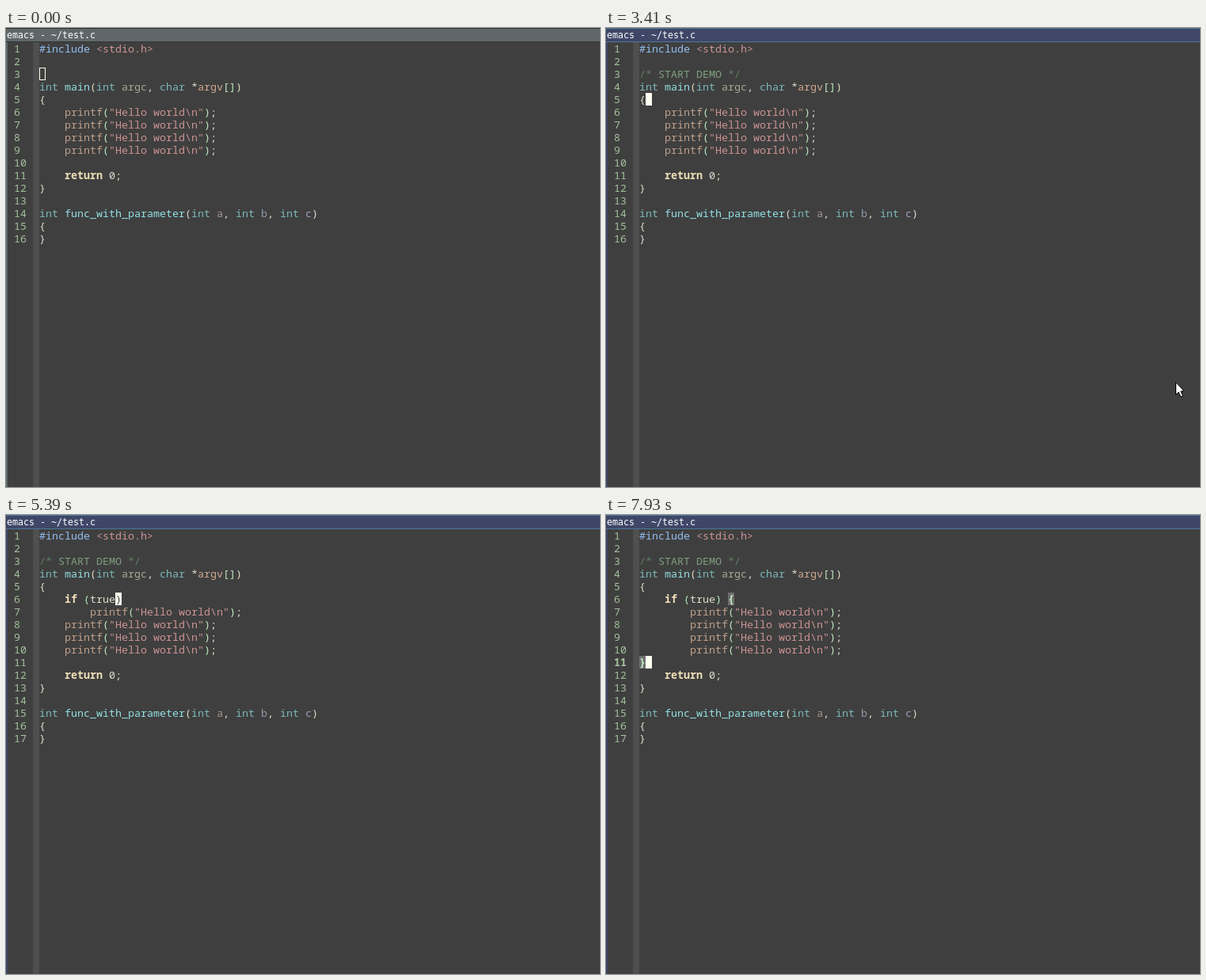
An HTML page with a canvas for the animation above (8000 ms loop, 750 by 580 pixels).

```html
<!DOCTYPE html>
<html lang="en">
<head>
<meta charset="utf-8">
<title>Editor session</title>
<style>
html, body { margin: 0; width: 100%; height: 100%; overflow: hidden; background: #3f3f3f; }
canvas { display: block; }
</style>
</head>
<body>
<canvas id="stage" width="750" height="580"></canvas>
<script>
const ctx = document.getElementById('stage').getContext('2d');
const LOOP = 8000, LEFT = 42, TOP = 18, CW = 8, LH = 16, WIDTH = 750, HEIGHT = 580;
const MONO = '13.333px "Noto Sans Mono", "DejaVu Sans Mono", monospace';

const BG = '#3f3f3f', FG = '#dcdccc', STRING = '#cc9393', CURSOR = '#ffffef';
const KEYWORD = '#f0e0b8', TYPE = '#7cb8bb', FUNC = '#93e0e3', INNER = '#bfebbf';
const WORDS = {
  '#include': '#94bff3', int: TYPE, char: TYPE, main: FUNC, func_with_parameter: FUNC,
  return: KEYWORD, if: KEYWORD, printf: '#c0a08a', argc: '#a3ab94', argv: '#d0a890',
  a: '#a0958f', b: '#8f9cac', c: '#a3a0c0', i: '#8fb29c'
};
const TOKEN = /\/\*|\*\/|"?[\w ]+\\n"|<[\w.]+>|#?\w+|[(){}\[\]]|[^\s\w]/g;

// Moments of the session in ms
const FOCUS = 300, SOLID = 410, OPEN_COMMENT = 980, FILL_COMMENT = 2230;
const DOWN = 3370, NEWLINE = 3760, REPAIR = 4400, TRAIL = 6770, SELECT = 6810;
const WRAP = 7760, MATCH = 7930;
const STEP = 40, REPEAT = 132.5;

// One time per keystroke of TYPED
const TYPED = 'if (true) ';
const KEYS = [4360, 4480, 4560, 4750, 4940, 5140, 5310, 5390, 5610, 5800];

const typedCount = t => KEYS.filter(k => k <= t).length;
const within = (t, a, b) => t >= a && t < b;

function box(x, y, w, h, color) {
  ctx.fillStyle = color;
  ctx.fillRect(x, y, w, h);
}

function cell(row, col, color) {
  box(LEFT + col * CW, TOP + row * LH, CW, LH, color);
}

function text(s, x, row, color, bold) {
  ctx.font = (bold ? 'bold ' : '') + MONO;
  ctx.fillStyle = color;
  ctx.fillText(s, x, TOP + row * LH + 13);
}

function commentAt(t) {
  if (t < OPEN_COMMENT) return '';
  if (t < FILL_COMMENT) return '/*  */';
  return '/* START DEMO' + (t < FILL_COMMENT + STEP ? '' : ' */');
}

// The closing parenthesis appears by itself until it is typed over.
function conditionAt(t) {
  const s = TYPED.slice(0, typedCount(t));
  const unclosed = s.includes('(') && !s.includes(')');
  return s + (unclosed ? ')' : '') + (t >= WRAP ? '{' : '');
}

function cursorAt(t) {
  if (t < OPEN_COMMENT) return [2, 0];
  if (t < DOWN) return [2, 3];
  if (t < DOWN + STEP) return [3, 3];
  if (t < NEWLINE) return [4, 1];
  if (t < SELECT) return [5, 4 + typedCount(t)];
  if (t >= WRAP) return [10, 1];
  const row = Math.min(10, 6 + Math.floor((t - SELECT) / REPEAT));
  return [row, row < 10 ? 14 : 0];
}

function buildLines(t) {
  const pad = n => ' '.repeat(n);
  const lines = ['#include <stdio.h>', '', commentAt(t),
    'int main(int argc, char *argv[])', '{'];
  if (t >= NEWLINE) lines.push(pad(4) + conditionAt(t));
  for (let k = 0; k < 4; k++) {
    const indented = t >= (k ? WRAP + STEP : KEYS[0]);
    const torn = !k && within(t, KEYS[0], REPAIR);
    lines.push(pad(indented ? 8 : 4) + 'printf(' + (torn ? '' : '"Hel') + 'lo world\\n");');
  }
  lines.push(t >= WRAP ? '}' : '', '    return 0;', '}', '',
    'int func_with_parameter(int a, int b, int c)', '{', '}');
  return lines;
}

function drawCode(lines, pairs, regionEnd) {
  const isPaired = (row, col) => pairs.some(p => p[0] === row && p[1] === col);
  let depth = 0;
  lines.forEach((line, row) => {
    text(String(row + 1), 10, row, '#a3c29c', row === 10 && isPaired(10, 0));
    const comment = line.startsWith('/*');
    const selected = row > 5 && row < regionEnd;
    for (const m of line.matchAll(TOKEN)) {
      const s = m[0];
      let color = WORDS[s] || FG;
      if (s === '/*' || s === '*/') color = '#5f7f5f';
      else if (comment) color = '#7f9f7f';
      else if (/["<]/.test(s)) color = selected ? '#d08a64' : STRING;
      else if ('({['.includes(s)) color = depth++ ? INNER : FG;
      else if (')}]'.includes(s)) color = --depth > 0 ? INNER : FG;
      text(s, LEFT + m.index * CW, row, color, color === KEYWORD || isPaired(row, m.index));
    }
  });
}

function drawFrame(focused) {
  const bar = focused ? '#3f4768' : '#5f676a';
  const edge = focused ? '#4c7899' : '#333333';
  box(0, 0, WIDTH, HEIGHT, BG);
  box(34, TOP, 8, HEIGHT, '#4f4f4f');
  box(0, 0, 2, HEIGHT, bar);
  box(0, 0, WIDTH, TOP, bar);
  box(0, 0, WIDTH, 1, edge);
  box(0, TOP - 1, WIDTH, 1, edge);
  ctx.font = '11.63px "DejaVu Sans Mono", "Liberation Mono", monospace';
  ctx.fillStyle = '#ffffff';
  ctx.fillText('emacs - ~/test.c', 1, 12.5);
}

function drawPointer() {
  ctx.fillStyle = '#ffffff';
  ctx.strokeStyle = '#000000';
  ctx.lineWidth = 1;
  const arrow = new Path2D('M719.5 447.8v15.5l3.5-3.2 2.7 6 2.6-1.3-2.6-5.7 4.3-.3z');
  ctx.fill(arrow);
  ctx.stroke(arrow);
}

function drawCursor(lines, t) {
  const [row, col] = cursorAt(t);
  const x = LEFT + col * CW;
  if (t < SOLID) {
    ctx.strokeStyle = CURSOR;
    ctx.lineWidth = 1;
    ctx.strokeRect(x + 0.5, TOP + row * LH + 0.5, CW - 1, LH - 1);
    return;
  }
  cell(row, col, CURSOR);
  text(lines[row][col] || '', x, row, BG);
}

function pairsAt(t) {
  if (within(t, KEYS[8] + 130, MATCH - 2000)) return [[5, 7], [5, 12]];
  return t >= MATCH ? [[5, 14], [10, 0]] : [];
}

function drawRegion(regionEnd) {
  for (let row = 5; row < regionEnd; row++) {
    const x = row === 5 ? LEFT + 14 * CW : LEFT;
    box(x, TOP + row * LH, WIDTH - x, LH, '#333333');
  }
}

function render(now) {
  const t = now % LOOP;
  const lines = buildLines(t), pairs = pairsAt(t);
  // The selection is painted one step ahead of the cursor.
  const regionEnd = within(t, SELECT, WRAP) ? cursorAt(Math.min(t + STEP, WRAP - 1))[0] : 0;
  drawFrame(t >= FOCUS);
  drawRegion(regionEnd);
  if (within(t, TRAIL, WRAP)) cell(5, 13, STRING);
  pairs.forEach(([row, col]) => cell(row, col, '#6f6f6f'));
  drawCode(lines, pairs, regionEnd);
  drawCursor(lines, t);
  if (within(t, FOCUS, NEWLINE)) drawPointer();
  requestAnimationFrame(render);
}

render(0);
</script>
</body>
</html>
```
